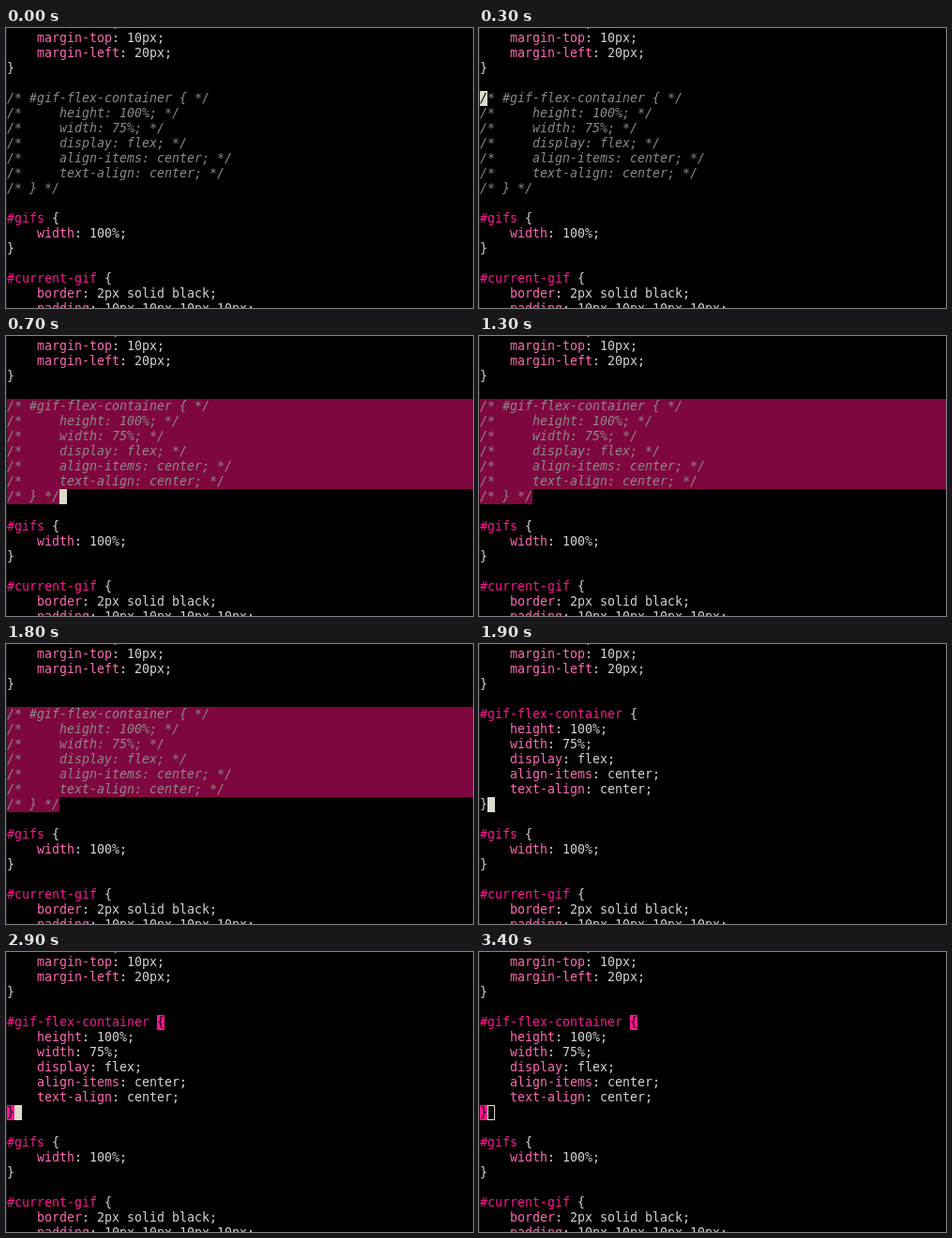
Write an HTML page that moves like this. It is 498 px wide and 298 px high and loops after 3.5 s.

```html
<!DOCTYPE html>
<html lang="en">
<head>
<meta charset="utf-8">
<title>Editor</title>
<style>
html, body { margin: 0; width: 100%; height: 100%; overflow: hidden; background: #000; }
svg { display: block; }
text { font: 13.29px "DejaVu Sans Mono", monospace; white-space: pre; }
.note { font-style: italic; }
</style>
</head>
<body>
<svg id="stage" width="498" height="298" viewBox="0 0 498 298"></svg>
<script>
const LOOP = 3500, CELL = 8, LINE = 16, LEFT = 1, TOP = 3;
const PLAIN = '#d3d3d3', PROP = '#ff69b4', RULE = '#ff1493', NOTE = '#8b8989',
      MARK = '#7f073f', CURSOR = '#dcdccc';
const stage = document.getElementById('stage');

function add(parent, tag, attrs, str) {
  const el = document.createElementNS('http://www.w3.org/2000/svg', tag);
  for (const k in attrs) el.setAttribute(k, attrs[k]);
  if (str) el.textContent = str;
  parent.appendChild(el);
  return el;
}
const group = () => add(stage, 'g', {});
const show = (el, on) => el.setAttribute('visibility', on ? 'visible' : 'hidden');
const px = col => LEFT + col * CELL;
const py = row => TOP + row * LINE;

function word(g, row, col, str, fill, cls = '') {
  return add(g, 'text', { x: px(col), y: py(row) + 12, fill, class: cls }, str);
}
function box(g, row, col, fill) {
  return add(g, 'rect', { x: px(col), y: py(row), width: CELL, height: LINE, fill });
}

// Colours one line of CSS: selector, property, then everything else
function css(g, row, line) {
  const [, pad, key, rest] = line.match(/^( *)(#?[a-z-]*)(.*)$/);
  const col = pad.length;
  if (key) word(g, row, col, key, key[0] === '#' ? RULE : PROP);
  if (rest) word(g, row, col + key.length, rest, PLAIN);
}

const rule = [
  '#gif-flex-container {',
  '    height: 100%;',
  '    width: 75%;',
  '    display: flex;',
  '    align-items: center;',
  '    text-align: center;',
  '}'
];
const FIRST = 4, LAST = FIRST + rule.length - 1;

add(stage, 'rect', { width: 498, height: 298, fill: '#000' });
add(stage, 'rect', { width: 1, height: 298, fill: '#1a1a1a' });

const region = group();
add(region, 'rect', { x: LEFT, y: py(FIRST), width: 497, height: LINE * (rule.length - 1), fill: MARK });
add(region, 'rect', { x: LEFT, y: py(LAST), width: CELL * 7, height: LINE, fill: MARK });

const still = group();
css(still, -1, '    width: 50%;');
['    margin-top: 10px;', '    margin-left: 20px;', '}']
  .forEach((s, i) => css(still, i, s));
['#gifs {', '    width: 100%;', '}', '',
 '#current-gif {', '    border: 2px solid black;', '    padding: 10px 10px 10px 10px;']
  .forEach((s, i) => css(still, LAST + 2 + i, s));

const notes = group();
rule.forEach((s, i) => word(notes, FIRST + i, 0, `/* ${s} */`, NOTE, 'note'));

const live = group();
rule.forEach((s, i) => css(live, FIRST + i, s));

const match = group();
for (const [row, col, ch] of [[FIRST, 20, '{'], [LAST, 0, '}']]) {
  box(match, row, col, RULE);
  word(match, row, col, ch, '#000');
}

const startCursor = group();
box(startCursor, FIRST, 0, CURSOR);
word(startCursor, FIRST, 0, '/', '#000', 'note');

const cursor = box(stage, LAST, 0, CURSOR);
const hollow = add(stage, 'rect', {
  x: px(1) + .5, y: py(LAST) + .5, width: CELL - 1, height: LINE - 1,
  fill: 'none', stroke: CURSOR
});

const SELECT = 700, UNCOMMENT = 1900, PAIR = 2100, BLUR = 3400;

function draw(t) {
  const within = (a, b) => t >= a && t < b;
  const open = t >= UNCOMMENT;

  show(region, within(SELECT, UNCOMMENT));
  show(notes, !open);
  show(live, open);
  show(match, t >= PAIR);

  show(startCursor, within(300, SELECT));
  cursor.setAttribute('x', px(open ? 1 : 7));
  show(cursor, within(SELECT, 1300) || within(UNCOMMENT, 2400) || within(2900, BLUR));
  show(hollow, t >= BLUR);
}

const start = performance.now();
function tick() {
  draw((performance.now() - start) % LOOP);
  requestAnimationFrame(tick);
}
tick();
</script>
</body>
</html>
```
